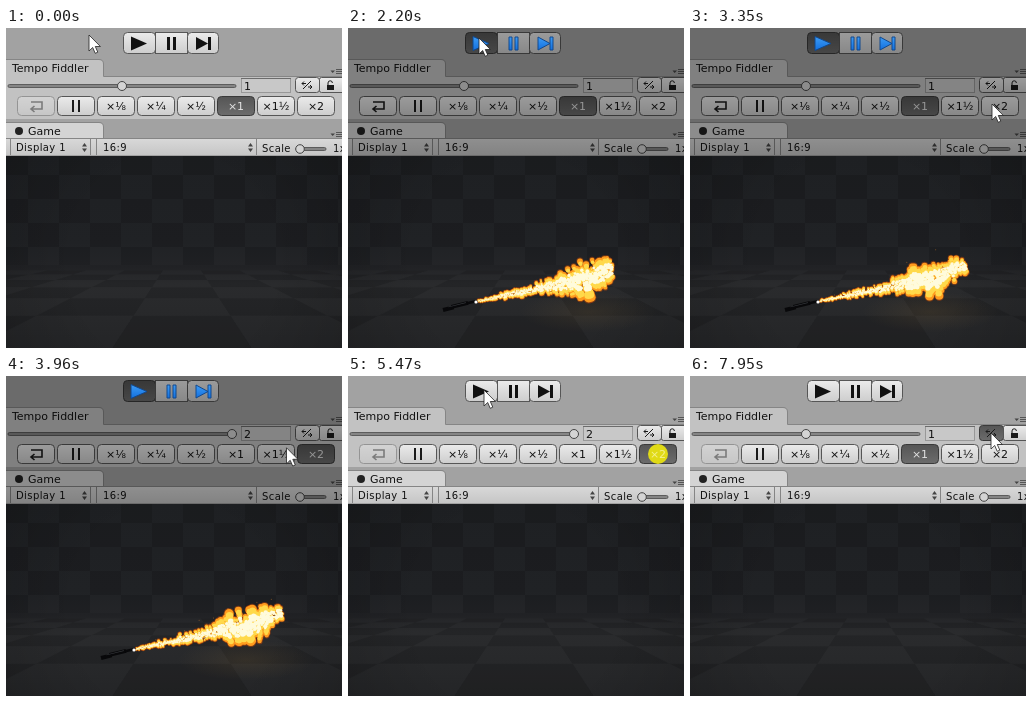
These frames come from a looping animation (336x320 px, 8 s). An HTML page with a canvas:

```html
<!DOCTYPE html>
<html lang="en">
<head>
<meta charset="utf-8">
<title>Time scale panel</title>
<style>
  html, body { margin: 0; width: 100%; height: 100%; overflow: hidden; background: #a2a2a2; }
  #stage { position: relative; width: 336px; height: 320px; overflow: hidden; }
  #stage > * { position: absolute; left: 0; top: 0; display: block; }
  #view { top: 128px; }
  text { font: 11px "DejaVu Sans", sans-serif; fill: #111; }
  .small { font-size: 10px; letter-spacing: .4px; }
  .mid { text-anchor: middle; }
  .edge { stroke: #5c5c5c; }
  .line { stroke: #858585; fill: none; }
  .btn rect { fill: url(#up); stroke: #565656; }
  .btn.down rect { fill: url(#down); stroke: #3a3a3a; }
  .btn.down text { fill: #e2e2e2; }
  .btn.off { opacity: .42; }
  .ink { fill: none; stroke: #1a1a1a; stroke-width: 1.6; }
  .thin { stroke-width: 1; }
  .knob { fill: #d4d4d4; stroke: #444; }
  #icons { fill: #111; }
  #icons.live { fill: url(#blue); stroke: #12488c; stroke-width: 1; }
</style>
</head>
<body>
<div id="stage">
  <canvas id="view" width="336" height="192"></canvas>
  <svg width="336" height="320" viewBox="0 0 336 320">
    <defs>
      <linearGradient id="up" x2="0" y2="1"><stop stop-color="#ebebeb"/><stop offset="1" stop-color="#cdcdcd"/></linearGradient>
      <linearGradient id="down" x2="0" y2="1"><stop stop-color="#555"/><stop offset="1" stop-color="#6c6c6c"/></linearGradient>
      <linearGradient id="bar" x2="0" y2="1"><stop stop-color="#d8d8d8"/><stop offset="1" stop-color="#c6c6c6"/></linearGradient>
      <linearGradient id="blue" x2="0" y2="1"><stop stop-color="#3d9cf5"/><stop offset="1" stop-color="#1270e0"/></linearGradient>
    </defs>
    <rect width="336" height="128" fill="#a2a2a2"/>
    <path d="M0 32H94Q97.500 32 97.500 36V48H336V91H0Z" fill="#c2c2c2"/>
    <path class="line" d="M0 31.500H93Q97.500 31.500 97.500 36V48.500H336"/>
    <path d="M0 91.500H336M0 127.500H336" stroke="#a2a2a2"/>
    <path d="M0 95H94Q97.500 95 97.500 99V111H0Z" fill="#d4d4d4"/>
    <path class="line" d="M0 94.500H93Q97.500 94.500 97.500 99V110.500"/>
    <rect y="111" width="336" height="16" fill="url(#bar)"/>
    <path class="line" d="M0 110.500H336M4.500 111V127M84.500 111V127M90.500 111V127M250.500 111V127"/>
    <text x="6" y="44">Tempo Fiddler</text>
    <circle cx="13" cy="103" r="4" fill="#222"/>
    <text x="22" y="107">Game</text>
    <text class="small" x="10" y="123">Display 1</text>
    <text class="small" x="97" y="123">16:9</text>
    <text class="small" x="256" y="124">Scale</text>
    <text class="small" x="327" y="124">1x</text>
    <path fill="#444" d="M76 118.500L78.500 115 81 118.500ZM76 120.500L78.500 124 81 120.500ZM242 118.500L244.500 115 247 118.500ZM242 120.500L244.500 124 247 120.500Z"/>
    <path fill="#444" d="M324.500 42.500H329L326.700 45ZM324.500 105.500H329L326.700 108Z"/>
    <path stroke="#555" d="M330 41.500H336M330 43.500H336M330 45.500H336M330 104.500H336M330 106.500H336M330 108.500H336"/>
    <rect x="290" y="119.500" width="30" height="3" rx="1.500" fill="#858585" class="edge"/>
    <circle class="knob" cx="294" cy="121" r="4.300"/>
    <rect x="2" y="56.500" width="228" height="3" rx="1.500" fill="#858585" class="edge"/>
    <circle id="knob" class="knob" cx="116" cy="58" r="4.500"/>
    <rect x="235.500" y="50.500" width="49" height="14" fill="#c8c8c8" stroke="#989898"/>
    <path d="M235 50.500H285" stroke="#6c6c6c"/>
    <text id="value" x="238" y="62">1</text>
    <g id="reset" class="btn"><rect x="289.500" y="49.500" width="24" height="15" rx="3"/></g>
    <g class="btn"><rect x="313.500" y="49.500" width="30" height="15" rx="2"/></g>
    <path class="ink thin" d="M297 61L305 53M296 55.500H300M296 55.500L298 53.500M296 55.500L298 57.500M306 59H302M306 59L304 57M306 59L304 61"/>
    <path class="ink thin" d="M322 57V55A2.200 2.200 0 0 1 326.400 55"/>
    <rect x="321" y="57" width="7" height="5" fill="#1a1a1a"/>
    <g id="speeds"></g>
    <g id="play" class="btn"><rect x="117.500" y="4.500" width="32" height="21" rx="4"/></g>
    <g class="btn"><rect x="149.500" y="4.500" width="32" height="21"/><rect x="181.500" y="4.500" width="31" height="21" rx="4"/></g>
    <rect id="tint" width="336" height="128" opacity=".34"/>
    <g id="icons">
      <path d="M125 8.500L141 15.500 125 22.500Z"/>
      <path d="M161 9H164V22H161ZM167 9H170V22H167Z"/>
      <path d="M190 9L202 15.500 190 22ZM202 9H205V22H202Z"/>
    </g>
    <circle id="mark" cx="310" cy="78" r="10" fill="#e0da16"/>
    <text id="markText" class="mid" x="310" y="82" style="fill:#f4f08c">×2</text>
    <path id="cursor" d="M0 0V16L3.700 12.500 6.200 18.300 8.800 17.200 6.300 11.500H11.400Z" fill="#fff" stroke="#222" stroke-width=".8"/>
  </svg>
</div>
<script>
const LOOP = 8000;
const PRESS = 1490, LIVE = 1630, FIRE = 1700, FREEZE = 5210, STOP = 5350;
const FAST = 3600, SLOW = 6750;
const $ = id => document.getElementById(id);
const clamp = v => Math.max(0, Math.min(1, v));
const smooth = v => (v = clamp(v), v * v * (3 - 2 * v));
const rnd = n => { const v = Math.sin(n * 127.1 + 3.7) * 43758.5453; return v - Math.floor(v); };
const ctx = $('view').getContext('2d');

// Speed buttons
const labels = ['', '', '×⅛', '×¼', '×½', '×1', '×1½', '×2'];
$('speeds').innerHTML = labels.map((s, i) => {
  const x = 11.5 + i * 40, c = x + 18.5;
  const art = i === 0
    ? '<path class="ink" d="M25 74H36V81H26M28.500 78L25 81 28.500 84"/>'
    : i === 1 ? '<path fill="#1a1a1a" d="M66 72H68V84H66ZM72 72H74V84H72Z"/>'
    : `<text class="mid" x="${c}" y="82">${s}</text>`;
  return `<g class="btn"><rect x="${x}" y="68.5" width="37" height="19" rx="4"/>${art}</g>`;
}).join('');
const speeds = $('speeds').children;

// Cursor stops: time, x, y, easing into the stop
const stops = [
  [0, 83, 7], [1110, 83, 7], [1430, 131, 10, 'both'], [2400, 131, 10],
  [2730, 158, 43, 'in'], [3350, 302, 76, 'out'], [3680, 302, 76],
  [3960, 281, 72, 'in'], [4540, 135, 12, 'out'], [4900, 135, 12], [5180, 136, 14, 'both'],
  [5969, 136, 14], [5970, 148, 25], [6180, 148, 25], [6570, 224, 78, 'both'],
  [6810, 224, 78], [7470, 301, 57, 'both'], [LOOP, 301, 57]
];
const ease = { in: p => p * p, out: p => 1 - (1 - p) ** 2, both: smooth };

function cursorAt(t) {
  const n = stops.findIndex(s => s[0] > t);
  const [t0, x0, y0] = stops[n - 1], [t1, x1, y1, kind] = stops[n];
  const p = (ease[kind] || (v => v))((t - t0) / (t1 - t0));
  return [x0 + (x1 - x0) * p, y0 + (y1 - y0) * p];
}

// Tiled wall that runs into a perspective floor
function buildRoom() {
  const room = document.createElement('canvas');
  room.width = 336; room.height = 192;
  const c = room.getContext('2d');
  const base = c.createLinearGradient(0, 0, 0, 192);
  [[0, '#1b1d20'], [.45, '#1d1f22'], [.58, '#212225'], [.67, '#27282a'], [.8, '#252628'], [1, '#212224']]
    .forEach(s => base.addColorStop(...s));
  c.fillStyle = base;
  c.fillRect(0, 0, 336, 192);
  for (let r = 0; r < 5; r++) {
    for (let i = -1; i < 12; i++) {
      c.fillStyle = (i + r) % 2 ? 'rgba(160,170,180,.022)' : 'rgba(0,0,0,.05)';
      c.fillRect(i * 31 - 9, r * 24 - 5, 31, r === 4 ? 18 : 24);
    }
  }
  const depth = n => 1 / (.0093 + .0041 * n);
  const edge = (k, d) => 176 + (k + .5) * 1.3 * d;
  for (let r = 0; r < 6; r++) {
    const a = depth(r), b = depth(r + 1);
    for (let i = -5; i < 5; i++) {
      c.fillStyle = (i + r) % 2 ? 'rgba(0,0,0,.07)' : 'rgba(190,190,190,.018)';
      c.beginPath();
      c.moveTo(edge(i, a), 85 + a);
      c.lineTo(edge(i + 1, a), 85 + a);
      c.lineTo(edge(i + 1, b), 85 + b);
      c.lineTo(edge(i, b), 85 + b);
      c.fill();
    }
  }
  const shade = c.createRadialGradient(168, 105, 100, 168, 105, 220);
  shade.addColorStop(0, 'rgba(0,0,0,0)');
  shade.addColorStop(1, 'rgba(0,0,0,.18)');
  c.fillStyle = shade;
  c.fillRect(0, 0, 336, 192);
  return room;
}
const room = buildRoom();

function dot(x, y, r, color) {
  ctx.fillStyle = color;
  ctx.beginPath();
  ctx.arc(x, y, r, 0, 7);
  ctx.fill();
}

function drawGun() {
  ctx.save();
  ctx.translate(95, 282);
  ctx.rotate(-.24);
  ctx.fillStyle = '#08080a';
  ctx.fillRect(0, -2, 11, 4);
  ctx.fillRect(9, -3, 17, 4);
  ctx.fillRect(25, -2, 8, 2.5);
  ctx.fillStyle = '#34363a';
  ctx.fillRect(6, -2, 18, .7);
  ctx.restore();
}

// Flame half-width at a distance from the nozzle
const spread = d => (1.4 + Math.min(d, 75) * .09 + 9.5 * smooth((d - 70) / 35)) * (1 - .5 * smooth((d - 120) / 30));
// Colour, sideways reach, dot scale, outline
const layers = [
  ['rgba(170,66,14,.6)', 1, 1, .7], ['#ff9c1e', .98, 1, 0],
  ['#ffd94a', .85, .8, 0], ['#fffbdc', .5, .6, 0]
];

function drawFlame(s) {
  const count = 600, life = .55;
  ctx.save();
  ctx.translate(240, 284);
  ctx.scale(1, .3);
  const glow = ctx.createRadialGradient(0, 0, 0, 0, 0, 68);
  glow.addColorStop(0, `rgba(150,115,60,${.16 * clamp(s / life)})`);
  glow.addColorStop(1, 'rgba(150,115,60,0)');
  ctx.fillStyle = glow;
  ctx.fillRect(-68, -68, 136, 136);
  ctx.restore();
  for (const [color, wide, size, outline] of layers) {
    for (let i = 0; i < count; i++) {
      const c = s / life + i / count, k = Math.floor(c), u = c - k;
      if (u * life > s) continue;
      const n = i + (k % 97) * count;
      const d = 149 * u ** .9;
      const across = rnd(n) * 2 - 1;
      // Neighbours on one side share a bulge, which makes the edge ragged
      const puff = .62 + .62 * rnd(Math.floor(n / 14) + (across > 0 ? .25 : .6));
      const w = spread(d) * puff;
      const side = across * w * .9 * wide;
      const r = (.6 + w * (.05 + .15 * rnd(n + .5))) * size + outline;
      const rise = .2 * d + 6 * smooth((d - 110) / 40);
      dot(130 + d * .98 + side * .2, 273 - rise + side, r, color);
    }
  }
  for (let i = 0; i < 9; i++) {
    const c = s * 1.3 + i / 9, k = Math.floor(c), u = c - k;
    if (u > s) continue;
    const n = i + k * 9 + .3;
    dot(140 + 130 * u, 268 - 27 * u + (rnd(n) - .6) * 55 * u, .5, 'rgba(255,150,40,.5)');
  }
  dot(128, 274, 1.6, '#fff');
}

function drawView(t) {
  ctx.setTransform(1, 0, 0, 1, 0, 0);
  ctx.drawImage(room, 0, 0);
  if (t < LIVE || t >= STOP) return;
  ctx.setTransform(1, 0, 0, 1, 0, -128);
  drawGun();
  const now = Math.min(t, FREEZE);
  if (now > FIRE) drawFlame((now - FIRE + Math.max(0, now - FAST)) / 1000);
}

const flag = (el, name, on) => el.classList.toggle(name, on);

function draw(t) {
  const playing = t >= PRESS && t < STOP, live = t >= LIVE && t < STOP;
  const fast = t >= FAST && t < SLOW;
  $('tint').style.display = playing ? '' : 'none';
  flag($('play'), 'down', playing);
  flag($('icons'), 'live', live);
  flag(speeds[0], 'off', !live);
  flag(speeds[5], 'down', !fast);
  flag(speeds[7], 'down', t >= FAST - 80 && t < SLOW);
  flag($('reset'), 'down', t >= 7950);
  $('knob').setAttribute('cx', fast ? 226 : 116);
  $('value').textContent = fast ? 2 : 1;
  const mark = t < 5970 ? clamp((t - 5370) / 90) : 0;
  $('mark').style.opacity = mark;
  $('markText').style.opacity = mark;
  $('cursor').setAttribute('transform', `translate(${cursorAt(t)})`);
  drawView(t);
}

function tick() {
  draw(performance.now() % LOOP);
  requestAnimationFrame(tick);
}
tick();
</script>
</body>
</html>
```
